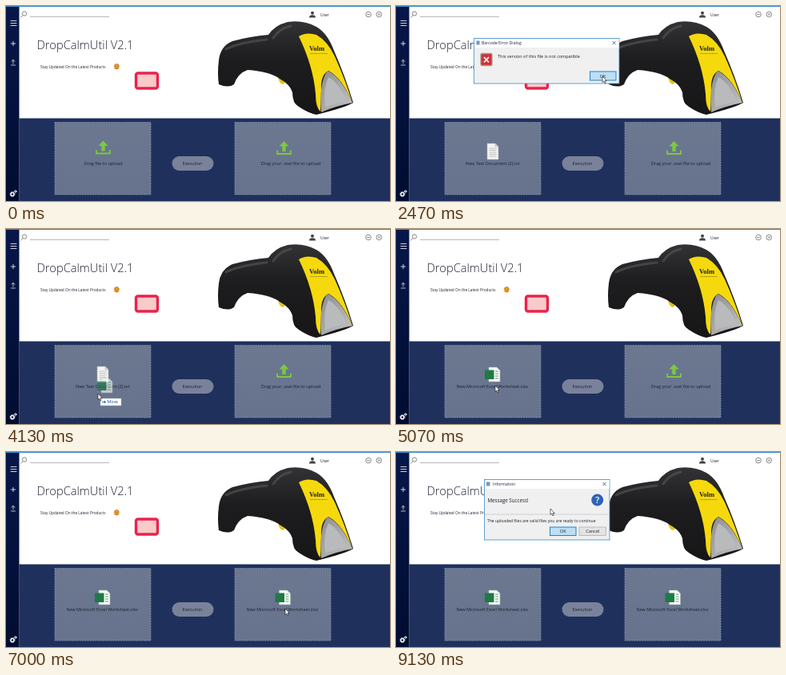
An HTML page that plays this animation: 480x244 px, repeating every 9190 ms.

```html
<!DOCTYPE html>
<html lang="en">
<head>
<meta charset="utf-8">
<title>File check</title>
<style>
  html, body { margin: 0; height: 100%; overflow: hidden; background: #fff; }
  svg { display: block; width: 100vw; height: 100vh; }
  text { font: 5.5px "Open Sans", sans-serif; fill: #1c2130; }
  .mid { text-anchor: middle; }
  .line { fill: none; stroke: #fff; stroke-linecap: round; }
  .zone { fill: url(#zoneFill); stroke: #8692ae; stroke-width: .8; stroke-dasharray: 2 1.2; }
  .window { fill: #f0f0f0; stroke: #3c8dc5; stroke-width: .8; }
  .button { fill: #e3e3e3; stroke: #a5a5a5; stroke-width: .7; }
  .primary { fill: #bcdff5; stroke: #2583c6; stroke-width: 1; }
</style>
</head>
<body>
<svg viewBox="0 0 480 244" preserveAspectRatio="none">
  <defs>
    <linearGradient id="sideFill" x2="0" y2="1">
      <stop stop-color="#07174a"/><stop offset="1" stop-color="#010c30"/>
    </linearGradient>
    <linearGradient id="zoneFill" x2="0" y2="1">
      <stop stop-color="#6c7790"/><stop offset="1" stop-color="#67738d"/>
    </linearGradient>
    <linearGradient id="bodyFill" x2="0" y2="1">
      <stop stop-color="#333335"/><stop offset=".4" stop-color="#1d1d1f"/><stop offset="1" stop-color="#161617"/>
    </linearGradient>
    <linearGradient id="glassFill" x2="1" y2="1">
      <stop stop-color="#8d8d8f"/><stop offset="1" stop-color="#c4c4c6"/>
    </linearGradient>
    <g id="upload" fill="#7bc843">
      <path d="M0-9 6-2.5H2.2V4H-2.2V-2.5H-6Z"/>
      <path d="M-8.5 2.5V7H8.5V2.5" fill="none" stroke="#7bc843" stroke-width="1.8"/>
    </g>
    <g id="doc">
      <path d="M-7-10H3L7-6V10H-7Z" fill="#f4f4f1" stroke="#a9adb3" stroke-width=".6"/>
      <path d="M3-10V-6H7" fill="#d5d8da" stroke="#a9adb3" stroke-width=".5"/>
      <path d="M-4.5-4H4.5M-4.5-1.5H4.5M-4.5 1H4.5M-4.5 3.5H4.5M-4.5 6H4.5" stroke="#a5a8ab" stroke-width=".7"/>
    </g>
    <g id="sheet">
      <path d="M-5-9H5L9-5V9H-5Z" fill="#f7f9f7" stroke="#a9b5ad" stroke-width=".6"/>
      <path d="M3-4H7M3-1H7M3 2H7M3 5H7" stroke="#5fa079" stroke-width="1"/>
      <rect x="-10" y="-5.5" width="11.5" height="11.5" fill="#1f7a45"/>
    </g>
    <path id="close" d="M-2-2 2 2M2-2-2 2" fill="none" stroke="#333" stroke-width=".7"/>
  </defs>

  <rect width="480" height="244" fill="#fff"/>
  <rect x="16.5" y="140.5" width="463.5" height="103.5" fill="#1f305c"/>
  <rect width="16.5" height="244" fill="url(#sideFill)"/>
  <rect width="480" height="1" fill="#3a8bcb"/>

  <g class="line">
    <path d="M6 18.5H13M6 21.5H13M6 24.5H13" stroke-width=".8"/>
    <path d="M6.3 47H11.7M9 44.3V49.7" stroke-width=".8"/>
    <path d="M9 72V67.5M7 69.3 9 67.3 11 69.3M6.5 74H11.5" stroke-width=".7"/>
    <circle cx="8" cy="235.5" r="2" stroke-width="1.4"/>
    <circle cx="8" cy="235.5" r="3" stroke-width=".9" stroke-dasharray="1.2 1.2" stroke-linecap="butt"/>
    <circle cx="11.8" cy="232" r="1.2" stroke-width="1"/>
  </g>

  <g fill="none" stroke="#555" stroke-width=".7">
    <circle cx="23" cy="9.5" r="2.7"/>
    <path d="M21 11.6 18.3 14.5"/>
    <path d="M30 13.5H129" stroke="#999"/>
    <circle cx="453" cy="10.5" r="3.3"/><path d="M451.3 10.5H454.7"/>
    <circle cx="466.3" cy="10.5" r="3.3"/><path d="M465 9.2 467.6 11.8M467.6 9.2 465 11.8"/>
  </g>
  <circle cx="383" cy="8.8" r="2" fill="#444"/>
  <path d="M379 14.5Q379 11.2 383 11.2T387 14.5Z" fill="#444"/>
  <text x="393" y="13" style="font-size:5px">User</text>

  <text x="38.5" y="54" style="font-size:14.7px;font-weight:300">DropCalmUtil V2.1</text>
  <text x="43" y="78" style="font-size:4.75px">Stay Updated On the Latest Products</text>
  <circle cx="138.3" cy="76" r="3.5" fill="#eca93f"/>
  <path d="M135.3 74.4Q138.3 71 141.3 74.4" fill="none" stroke="#c9692f" stroke-width="1"/>
  <path d="M136.5 75.4H137.6M139.2 75.4H140.3" stroke="#5c3512" stroke-width=".9"/>
  <path d="M136.8 77.3H140Q138.4 80 136.8 77.3Z" fill="#d2413a"/>
  <rect x="162.5" y="84" width="27" height="19" rx="2.5" fill="#f8caca" stroke="#e9234c" stroke-width="3.4"/>

  <g id="scanner">
    <path d="M340 88Q341 97 346 98Q351 96 350 90Z" fill="#e5c21b"/>
    <path fill="url(#bodyFill)" d="M266 98Q264 84 266 68Q268 50 283 44Q305 38 328 36Q336 24 352 20Q372 17 388 26Q402 34 410 56Q424 88 434 121Q424 127 388 136Q378 134 366 126Q358 122 358 108Q355 98 342 91Q330 82 302 80Q290 84 285 98Q278 103 266 98Z"/>
    <path d="M275 54Q290 46 326 42M334 40Q342 28 356 25" fill="none" stroke="#5c5c60" stroke-width="3" stroke-linecap="round" opacity=".55"/>
    <path fill="#f5d90d" d="M366 38Q375 32 388 36Q402 44 411 63Q424 92 433 121Q420 90 403 81Q393 86 394 106L393 132Q387 127 387 110Q384 75 366 38Z"/>
    <path fill="url(#glassFill)" d="M402 81Q419 89 433 121Q412 125 394 133Q391 95 402 81Z"/>
    <path fill="#b9babc" d="M403 89Q416 96 426 119Q411 122 399 127Q396 103 403 89Z"/>
    <text x="379" y="56" style="font:bold 8.5px 'Liberation Serif',serif">Volm</text>
    <text x="380" y="59.5" style="font-size:2.2px">scan and sort devices</text>
  </g>

  <rect class="zone" x="61" y="145.5" width="120" height="90.5"/>
  <rect class="zone" x="286" y="145.5" width="120" height="90.5"/>
  <rect x="207.5" y="188" width="52" height="18" rx="9" fill="#79829a"/>
  <text class="mid" x="233" y="199.3">Execution</text>

  <g id="leftEmpty">
    <use href="#upload" x="121.5" y="177.5"/>
    <text class="mid" x="121.5" y="199" style="font-size:5.6px">Drag file to upload</text>
  </g>
  <g id="leftDoc">
    <use href="#doc" x="121" y="182"/>
    <text class="mid" x="120.8" y="199">New Text Document (2).txt</text>
  </g>
  <g id="leftSheet">
    <use href="#sheet" x="121" y="182"/>
    <text class="mid" x="120.3" y="199" style="font-size:5.4px">New Microsoft Excel Worksheet.xlsx</text>
  </g>
  <g id="rightEmpty">
    <use href="#upload" x="347.5" y="178"/>
    <text class="mid" x="356" y="199" style="font-size:5.6px">Drag your .xsel file to upload</text>
  </g>
  <g id="rightSheet">
    <use href="#sheet" x="346.5" y="182"/>
    <text class="mid" x="345.5" y="199" style="font-size:5.4px">New Microsoft Excel Worksheet.xlsx</text>
  </g>

  <g id="errorBox">
    <rect class="window" x="97.5" y="40.5" width="181.5" height="56.5"/>
    <rect x="98" y="41" width="180.5" height="11" fill="#fff"/>
    <rect x="100.5" y="43.5" width="4" height="5" fill="#7c95ad"/>
    <text x="107" y="48.3" style="font-size:5.15px">Barcode Error Dialog</text>
    <use href="#close" x="272.5" y="46"/>
    <rect x="106" y="59.5" width="14" height="15" rx="1.5" fill="#d22f3b" stroke="#a39a80" stroke-width="1.3"/>
    <path d="M110 64 116 70.5M116 64 110 70.5" stroke="#fff" stroke-width="1.8"/>
    <text x="127" y="65">This version of this file is not compatible</text>
    <rect class="primary" x="242.5" y="82" width="32.5" height="11"/>
    <text class="mid" x="258.5" y="89.5">OK</text>
  </g>

  <g id="infoBox">
    <rect class="window" x="110.5" y="34.5" width="156.5" height="75.5"/>
    <rect x="111" y="35" width="155.5" height="11" fill="#fff"/>
    <rect x="113" y="37.5" width="4.5" height="5" fill="#7c95ad"/>
    <text x="121" y="42.3" style="font-size:5.05px">Information</text>
    <use href="#close" x="260.5" y="40"/>
    <text x="114.5" y="62.5" style="font-size:6.2px">Message Success!</text>
    <circle cx="251.7" cy="60" r="7.5" fill="#2f62b5"/>
    <text class="mid" x="251.7" y="64" style="font-size:11px;font-weight:600;fill:#fff">?</text>
    <path d="M111 78H266.5" stroke="#c9c9c9" stroke-width=".8"/>
    <text x="114" y="88" style="font-size:5px">The uploaded files are valid files you are ready to continue</text>
    <rect class="primary" x="192.5" y="94" width="32.5" height="10.5"/>
    <text class="mid" x="208.7" y="101.2">OK</text>
    <rect class="button" x="229" y="94" width="33.5" height="10.5"/>
    <text class="mid" x="245.7" y="101.2">Cancel</text>
  </g>

  <g id="pointer">
    <g id="drag">
      <g opacity=".65">
        <use id="dragDoc" href="#doc" x="10" y="-10"/>
        <use id="dragSheet" href="#sheet" x="9" y="-10"/>
      </g>
      <rect x="3" y="6" width="26" height="9" fill="#fff" stroke="#aaa" stroke-width=".6"/>
      <path d="M5 10.5H9.5M7.7 8.7 9.5 10.5 7.7 12.3" fill="none" stroke="#1f6fc0" stroke-width="1"/>
      <text x="11.5" y="12.5" style="font-size:5.3px;fill:#24489a">Move</text>
    </g>
    <path d="M0 0V7.5L1.7 6 3 8.8 4.2 8.2 3 5.5H5.3Z" fill="#fff" stroke="#111" stroke-width=".6"/>
  </g>
</svg>
<script>
const LOOP = 9190, STEP = 200 / 3;
const get = id => document.getElementById(id);
const show = (id, visible) => get(id).style.display = visible ? "" : "none";

// time, x, y of the pointer tip
const path = [
  [0, 165, 268], [270, 165, 268], [1070, 137, 194], [1470, 137, 194],
  [2270, 258, 88], [2630, 258, 88], [3270, 180, 250], [3500, 116, 268],
  [4130, 115, 206], [4600, 124, 196], [5270, 124, 196], [5730, 190, 250],
  [5870, 320, 268], [6270, 330, 268], [6800, 349, 196], [7000, 349, 196],
  [7500, 236, 195], [7670, 236, 195], [7870, 239, 171], [8900, 193, 71], [9190, 193, 71]
];

function pointerAt(t) {
  const i = path.findIndex(p => p[0] > t);
  const [t0, x0, y0] = path[i - 1], [t1, x1, y1] = path[i];
  const u = (t - t0) / (t1 - t0), k = u * u * (3 - 2 * u);
  return [x0 + (x1 - x0) * k, y0 + (y1 - y0) * k];
}

function draw(now) {
  const t = Math.floor((now % LOOP + 4) / STEP) * STEP;
  const within = (a, b) => t >= a && t < b;

  show("leftEmpty", t < 1130);
  show("leftDoc", within(1130, 4730));
  show("leftSheet", t >= 4730);
  show("rightEmpty", t < 6900);
  show("rightSheet", t >= 6900);
  show("errorBox", within(1930, 2600));

  const fade = Math.min(1, Math.max(0, (t - 7870) / 200)), size = .9 + .1 * fade;
  get("infoBox").setAttribute("opacity", fade);
  get("infoBox").setAttribute("transform", `translate(189 72) scale(${size}) translate(-189 -72)`);

  const early = t < 1130;
  show("drag", early || within(3500, 4730) || within(5870, 6900));
  show("dragDoc", early);
  show("dragSheet", !early);
  get("pointer").setAttribute("transform", `translate(${pointerAt(t)})`);
}

function tick() {
  draw(performance.now());
  requestAnimationFrame(tick);
}
tick();
</script>
</body>
</html>
```
